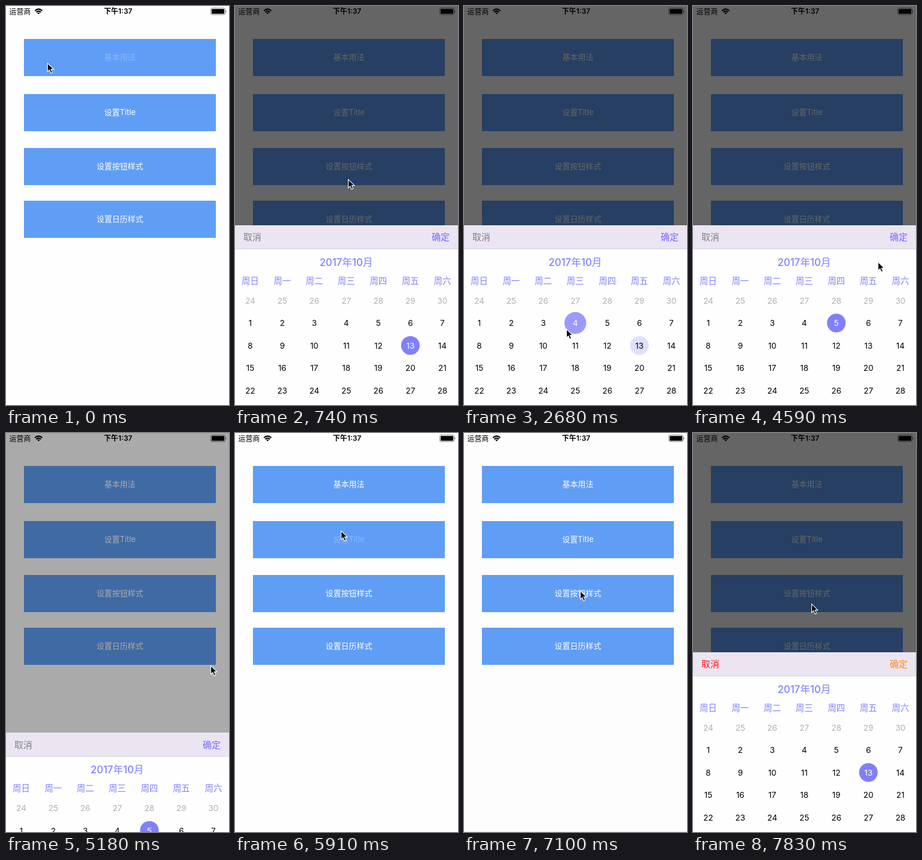
These frames come from a looping animation (373 by 666 pixels, 8 s). An HTML page:

```html
<!DOCTYPE html>
<html lang="zh-CN">
<head>
<meta charset="utf-8">
<style>
html, body { margin: 0; width: 100%; height: 100%; overflow: hidden; background: #fefefe; }
svg { display: block; width: 373px; height: 666px; }
text { font-family: Inter, "Noto Sans CJK SC", "Noto Sans CJK", "Noto Sans", sans-serif; }
</style>
</head>
<body>
<svg id="stage" viewBox="0 0 373 666"></svg>
<script>
const LOOP = 8000, STEP = 147.7;
const WIDTH = 373, HEIGHT = 666, PANEL_H = 300;
const PURPLE = '#8080ff', DOT_R = 15.6;
const stage = document.getElementById('stage');

function add(parent, tag, attrs = {}, content) {
  const el = document.createElementNS('http://www.w3.org/2000/svg', tag);
  for (const key in attrs) el.setAttribute(key, attrs[key]);
  if (content !== undefined) el.textContent = content;
  parent.appendChild(el);
  return el;
}
const set = (el, key, value) => el.setAttribute(key, value);
const rect = (parent, x, y, width, height, fill, more) =>
  add(parent, 'rect', { x, y, width, height, fill, ...more });

// Text placed by its visual middle
function label(parent, content, x, y, size, fill, more) {
  return add(parent, 'text', {
    x, y: y + size * 0.36, 'font-size': size, fill, 'text-anchor': 'middle', ...more
  }, content);
}

// Home screen
rect(stage, 0, 0, WIDTH, HEIGHT, '#fefefe');
label(stage, '运营商', 5.5, 9.4, 12, '#000', { 'text-anchor': 'start' });
label(stage, '下午1:37', 187.5, 9, 12, '#000', { 'font-weight': 600 });

const wifi = add(stage, 'g', { fill: 'none', stroke: '#000', 'stroke-width': 2.1 });
add(wifi, 'path', { d: 'M48.3 8.1Q54.5 2.3 60.7 8.1' });
add(wifi, 'path', { d: 'M50.6 10.5Q54.5 6.9 58.4 10.5' });
add(wifi, 'path', { d: 'M52.3 11.6Q54.5 9.9 56.7 11.6L54.5 14Z', fill: '#000', stroke: 'none' });

rect(stage, 342.5, 3.5, 24, 11, 'none', { rx: 2.5, stroke: '#808080' });
rect(stage, 344, 5, 21, 8, '#000', { rx: 1 });
add(stage, 'path', { d: 'M367.3 7.2Q368.8 7.6 368.8 9T367.3 10.8Z', fill: '#808080' });

const buttons = [['基本用法', 55], ['设置Title', 147], ['设置按钮样式', 237], ['设置日历样式', 325]]
  .map(([name, y]) => {
    rect(stage, 30, y, 321, 62, '#609ef6');
    return label(stage, name, 190.5, y + 30.2, 13, '#fff');
  });

const dim = rect(stage, 0, 0, WIDTH, HEIGHT, '#000');

// Date picker
const panel = add(stage, 'g');
rect(panel, 0, 366, WIDTH, PANEL_H, '#fefefe');
rect(panel, 0, 366, WIDTH, 40, '#ebe5f2');
rect(panel, 0, 405, WIDTH, 1, '#d6d0de');
const cancel = label(panel, '取消', 14, 386, 15, '#808080', { 'text-anchor': 'start' });
const confirm = label(panel, '确定', 359, 386, 15, '#7468ff', { 'text-anchor': 'end' });
const titles = ['2017年10月', '2017年11月'].map(name =>
  label(panel, name, 186, 428, 16.8, PURPLE, { 'font-weight': 500 }));

const colX = col => 25.5 + col * 375 / 7;
const rowY = row => 492 + row * 37.5;
[...'日一二三四五六'].forEach((day, i) => label(panel, '周' + day, colX(i), 458.5, 14.4, PURPLE));

const pages = add(panel, 'g');
const dots = {}, dayText = {};
for (const day of [13, 4, 5]) {
  const cell = day + 6;
  dots[day] = add(pages, 'circle', { cx: colX(cell % 7), cy: rowY(Math.floor(cell / 7)) - 0.4, fill: PURPLE });
}

// Five weeks of a month, beginning on the given day of the month before
function addMonth(page, month, firstDay) {
  for (let i = 0; i < 35; i++) {
    const date = new Date(2017, month - 2, firstDay + i);
    const inside = date.getMonth() === month - 1;
    const el = label(pages, date.getDate(), colX(i % 7) + page * WIDTH, rowY(Math.floor(i / 7)), 13.5,
      inside ? '#000' : '#b0b0b0');
    if (inside && page === 0) dayText[date.getDate()] = el;
  }
}
addMonth(0, 10, 24);
addMonth(1, 11, 29);

const cursor = add(stage, 'path', {
  d: 'M.5 .5V14.7L3.7 11.7L6.1 17L8.6 15.9L6.3 10.6H10.8Z',
  fill: '#000', stroke: '#fff', 'stroke-width': 1.1
});

// Motion
const OPENS = [200, 6050, 7400], CLOSES = [5030, 6800], SLIDE = 300;
const TAPS = [[-LOOP, 13], [2562, 4], [3930, 5], [5500, 13]];
const GLIDE = 450;
// Pointer stops: arrival time, x, y
const STOPS = [
  [0, 69, 95], [740, 189, 289], [1330, 285, 566], [1700, 110, 574], [2240, 190, 562], [2640, 171, 539],
  [3900, 234, 541], [4570, 309, 427], [4950, 342, 388], [5900, 177, 163], [6480, 194, 263], [7820, 198, 285]
];

const clamp = v => Math.max(0, Math.min(1, v));
const smooth = p => p * p * (3 - 2 * p);
const ramp = (t, start, length) => smooth(clamp((t - start) / length));
const ramps = (t, starts) => starts.reduce((sum, start) => sum + ramp(t, start, SLIDE), 0);

function pointer(t) {
  let [last, x, y] = STOPS[0];
  for (const [arrive, nextX, nextY] of STOPS.slice(1)) {
    const start = Math.max(last, arrive - GLIDE);
    const p = ramp(t, start, arrive - start);
    x += (nextX - x) * p;
    y += (nextY - y) * p;
    last = arrive;
  }
  return `translate(${x} ${y})`;
}

// A tapped day pops past its size and settles; the one before fades
function drawSelection(t) {
  const now = TAPS.filter(([start]) => start <= t).length - 1;
  const [start, day] = TAPS[now];
  const previous = now > 0 ? TAPS[now - 1][1] : 0;
  const age = t - start;
  const scale = age < 100 ? .3 + .9 * age / 100 : 1.2 - .2 * clamp((age - 100) / 100);
  for (const key in dots) {
    const active = +key === day;
    const alpha = active ? clamp(age / 122) : +key === previous ? clamp(1 - age / 126) : 0;
    set(dots[key], 'opacity', alpha);
    set(dots[key], 'r', DOT_R * (active ? scale : 1));
    set(dayText[key], 'fill', active ? '#fff' : '#000');
  }
}

function draw(t) {
  const shown = ramps(t, OPENS) - ramps(t, CLOSES);
  const page = ramp(t, 1330, 500) - ramp(t, 2070, 170);
  const styled = t >= OPENS[2];

  set(dim, 'opacity', .6 * shown);
  set(panel, 'transform', `translate(0 ${PANEL_H * (1 - shown)})`);
  set(panel, 'visibility', shown > 0 ? 'visible' : 'hidden');
  set(cancel, 'fill', styled ? '#f8141c' : '#808080');
  set(confirm, 'fill', styled ? '#ff8a14' : '#7468ff');

  set(pages, 'transform', `translate(${-WIDTH * page} 0)`);
  titles.forEach((el, i) => {
    set(el, 'x', 186 + (i - page) * WIDTH / 2);
    set(el, 'opacity', 1 - Math.abs(i - page));
  });
  drawSelection(t);

  // Each button is pressed just before its panel opens
  OPENS.forEach((open, i) => {
    const wait = open - t;
    set(buttons[i], 'opacity', wait > 60 && wait <= 210 ? .25 : 1);
  });
  set(cursor, 'transform', pointer(t));
}

const begin = performance.now();
function frame() {
  const t = (performance.now() - begin) % LOOP;
  draw(Math.floor(t / STEP) * STEP);
  requestAnimationFrame(frame);
}
frame();
</script>
</body>
</html>
```
